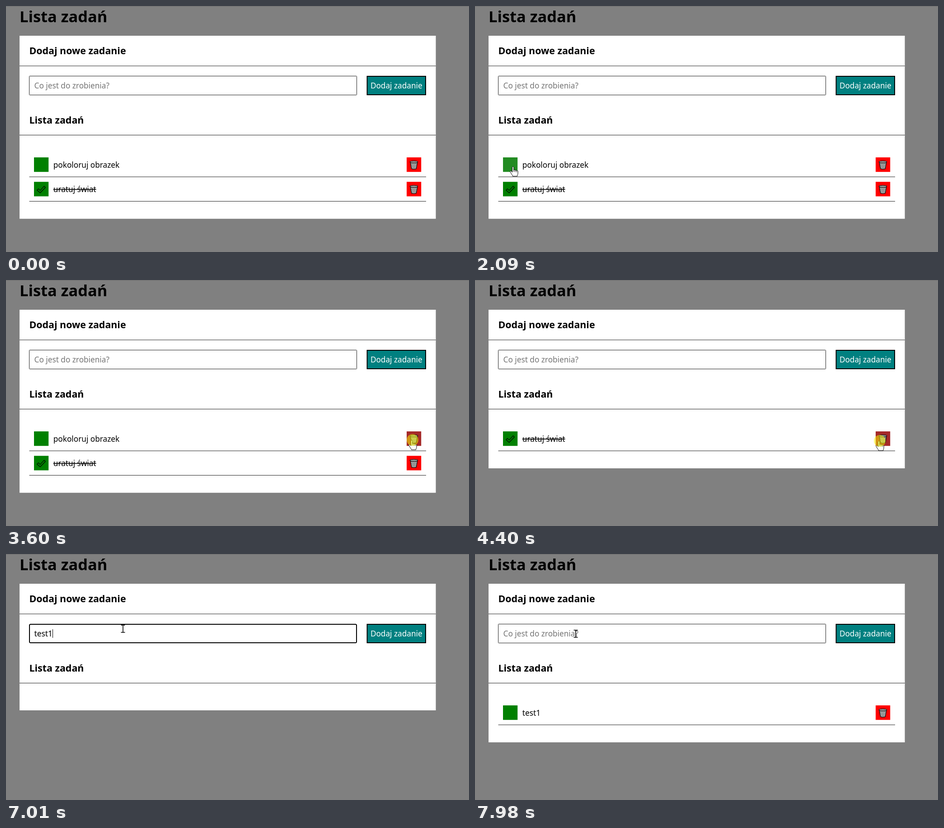
An HTML page that plays this animation: 1025x546 px, repeating every 8 s.

```html
<!DOCTYPE html>
<html lang="pl">
<head>
<meta charset="utf-8">
<title>Lista zadań</title>
<style>
  html, body { margin: 0; width: 100%; height: 100%; overflow: hidden; background: #808080; }
  svg { display: block; width: 100vw; height: 100vh; }
  text { font: 17.2px "Noto Sans", "Open Sans", sans-serif; white-space: pre; }
  .h1 { font-size: 34.4px; font-weight: 700; }
  .h2 { font-size: 21.4px; font-weight: 700; }
  .rule { stroke: #222; stroke-width: 1; }
  .done { text-decoration: line-through; }
</style>
</head>
<body>
<svg viewBox="0 0 1025 546">
  <defs>
    <pattern id="mesh" width="3" height="3" patternUnits="userSpaceOnUse" patternTransform="rotate(45)">
      <rect width="3" height="3" fill="#b4b4b4"/>
      <path d="M0 0H3M0 0V3" stroke="#555" stroke-width="1"/>
    </pattern>
    <g id="bin" stroke="#000" stroke-linejoin="round">
      <path d="M-8-7 L-5.5 8 Q0 10.5 5.5 8 L8-7Z" fill="url(#mesh)" stroke-width="1.2"/>
      <ellipse cy="-7" rx="8.6" ry="2.3" fill="#9a9a9a" stroke-width="1.1"/>
    </g>
    <path id="check" d="M-9.3 2 L-6.2-1.2 L-2.4 2.6 L6.4-6.8 L9.3-4 L-2.4 8Z"
      fill="none" stroke="#000" stroke-width="1.1" stroke-linejoin="round"/>
  </defs>

  <rect width="1025" height="546" fill="#808080"/>
  <rect width="1025" height="1" fill="#6c6c6c"/>
  <text class="h1" x="30" y="36">Lista zadań</text>
  <rect id="card" x="30" y="66" width="921.5" fill="#fff"/>
  <text class="h2" x="51.5" y="107">Dodaj nowe zadanie</text>
  <path class="rule" d="M30 133H951.5M30 286.5H951.5"/>
  <text class="h2" x="51.5" y="260.5">Lista zadań</text>

  <rect id="field" fill="#fff"/>
  <text id="entry" x="62.6" y="183"></text>
  <rect id="caret" y="167" width="1" height="19"/>
  <rect id="add" x="799.5" y="156" width="129.5" height="41" stroke="#000" stroke-width="2"/>
  <text x="864.3" y="183" fill="#fff" text-anchor="middle">Dodaj zadanie</text>

  <g id="rows"></g>

  <g id="cursor" fill="#fff" stroke="#000" stroke-linejoin="round">
    <path id="arrow" d="M.5.5V16.7L4.2 13.2 6.8 19 9.4 17.9 6.9 12.2H12Z"/>
    <g id="hand">
      <path d="M-1.5 1.2C-1.5-.8 1.7-.8 1.7 1.2V7.5C1.9 6 4.6 6 4.8 8 5.2 6.8 7.8 7 8 8.8 8.6 7.8 11 8.2 11 10V14.5C11 17.5 9.5 18 9.5 20.8H-.5C-.8 18.5-3 17-4.2 14.2L-6 11C-6.8 9-4 8-3 10L-1.5 12Z"/>
      <path d="M1.7 7V11M4.8 8V11.4M8 8.8V11.8" fill="none"/>
    </g>
    <path id="beam" d="M-4.5-8H4.5M0-8V8M-4.5 8H4.5" fill="none" stroke-width="1.6"/>
  </g>
  <circle id="click" r="13" fill="#ff0" fill-opacity=".5"/>
</svg>
<script>
const LOOP = 8000, ROW_H = 54.25;
const $ = id => document.getElementById(id);
const set = (el, attrs) => { for (const k in attrs) el.setAttribute(k, attrs[k]); };
const show = (el, on) => el.setAttribute("visibility", on ? "inherit" : "hidden");

// Pointer moves, each easing out along a slightly sagging line
const entryPoint = { x: 928, y: 546 };
const moves = [
  { from: 790, to: 1350, x: 912, y: 358 },
  { from: 1410, to: 1900, x: 84, y: 357, sag: 20 },
  { from: 2490, to: 3490, x: 898, y: 356, sag: 23 },
  { from: 4010, to: 4400, x: 894, y: 358 },
  { from: 4480, to: 4810, x: 255, y: 166 },
  { from: 7010, to: 7500, x: 832, y: 187 },
  { from: 7770, to: 7980, x: 223, y: 177 }
];

// Button presses and what they cause
const removeFirst = 3680, removeSecond = 4480, focusAt = 5010, blurAt = 7570, addAt = 7705;
const clicks = [[3530, removeFirst], [4270, removeSecond], [focusAt, 5220], [blurAt, addAt]];
const word = "test1", keyTimes = [5550, 5820, 6020, 6360, 6810];
const first = { text: "pokoloruj obrazek" };
const second = { text: "uratuj świat", done: true };

const within = (t, a, b) => t >= a && t < b;
const easeOut = k => 1 - (1 - k) ** 3;

function pointAt(t) {
  let { x, y } = entryPoint;
  for (const m of moves) {
    if (t < m.from) break;
    const k = easeOut(Math.min(1, (t - m.from) / (m.to - m.from)));
    x += (m.x - x) * k;
    y += (m.y - y) * k + (m.sag || 0) * Math.sin(Math.PI * k);
  }
  return [x, y];
}

function tasksAt(t) {
  if (t >= addAt) return [{ text: word }];
  return [t < removeFirst && first, t < removeSecond && second].filter(Boolean);
}

const typedAt = t => t < addAt ? word.slice(0, keyTimes.filter(k => k <= t).length) : "";

const rows = [0, 1].map(i => {
  const g = document.createElementNS("http://www.w3.org/2000/svg", "g");
  g.setAttribute("transform", `translate(0 ${i * ROW_H})`);
  g.innerHTML = `
    <rect x="62" y="336" width="32.2" height="32.2"/>
    <use href="#check" x="78" y="352.5"/>
    <text x="104.8" y="359"></text>
    <rect x="887" y="336" width="32.2" height="32.2"/>
    <use href="#bin" x="903" y="353"/>
    <path class="rule" d="M51.5 379.2H930"/>`;
  $("rows").append(g);
  const [toggle, check, label, remove] = g.children;
  return { g, toggle, check, label, remove, top: 336 + i * ROW_H };
});

function drawField(t) {
  const value = typedAt(t), focus = within(t, focusAt, blurAt), border = focus ? 2 : 1;
  const entry = $("entry");
  entry.textContent = value || "Co jest do zrobienia?";
  set(entry, { fill: value ? "#000" : "#757575" });
  set($("field"), {
    x: 51 + border / 2, y: 155 + border / 2, width: 726 - border, height: 43 - border,
    stroke: focus ? "#000" : "#222", "stroke-width": border, rx: focus ? 2.5 : 1
  });
  show($("caret"), focus);
  set($("caret"), { x: Math.round(62.6 + (value ? entry.getComputedTextLength() : 0)) });
}

function draw(t) {
  const active = t >= moves[0].from;
  const [x, y] = pointAt(t);
  const over = (l, top, w, h) => active && within(x, l, l + w) && within(y, top, top + h);
  const tasks = tasksAt(t);
  let hand = over(798, 155, 132, 43);

  set($("card"), { height: tasks.length ? 297.75 + tasks.length * ROW_H : 281 });
  set($("add"), { fill: hand ? "#1aa6a6" : "#008080" });

  rows.forEach((row, i) => {
    const task = tasks[i];
    show(row.g, task);
    if (!task) return;
    const onToggle = over(62, row.top, 32, 32), onRemove = over(887, row.top, 32, 32);
    hand = hand || onToggle || onRemove;
    set(row.toggle, { fill: onToggle ? "#228b22" : "#008000" });
    set(row.remove, { fill: onRemove ? "#a52a2a" : "#ff0000" });
    show(row.check, task.done);
    row.label.textContent = task.text;
    set(row.label, { class: task.done ? "done" : "" });
  });

  drawField(t);

  const beam = over(51, 155, 726, 43);
  show($("cursor"), active);
  set($("cursor"), { transform: `translate(${Math.round(x)} ${Math.round(y)})` });
  show($("hand"), hand);
  show($("beam"), beam);
  show($("arrow"), active && !hand && !beam);
  show($("click"), clicks.some(([a, b]) => within(t, a, b)));
  set($("click"), { cx: x + 2, cy: y - 1 });
}

const began = performance.now();
function tick() {
  draw((performance.now() - began) % LOOP);
  requestAnimationFrame(tick);
}
tick();
</script>
</body>
</html>
```
